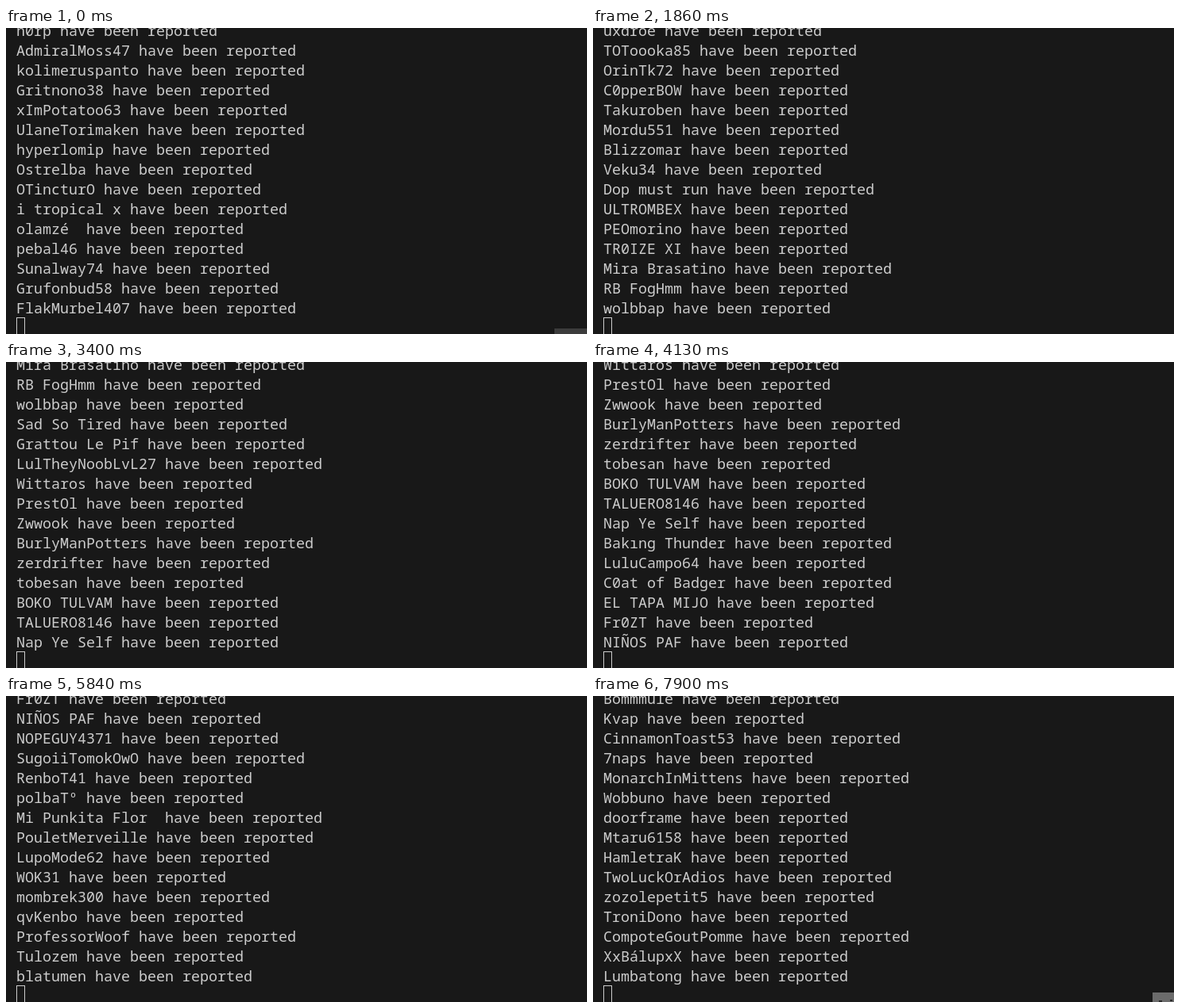
An HTML page that plays this animation: 731 px wide and 386 px high, repeating every 8 s.

```html
<!DOCTYPE html>
<html lang="en">
<head>
<meta charset="utf-8">
<title>Terminal log</title>
<style>
  html, body { margin: 0; width: 100%; height: 100%; overflow: hidden; background: #181818; }
  svg { display: block; width: 731px; height: 386px; }
  text { font: 18.333px "Noto Sans Mono", "DejaVu Sans Mono", monospace; fill: #ccc; white-space: pre; }
</style>
</head>
<body>
<svg viewBox="0 0 731 386">
  <g id="log"></g>
  <rect x="13.5" y="365.5" width="10" height="24" fill="none" stroke="#ccc"/>
  <rect id="sliver" x="690" y="379" width="41" height="7" fill="#3c3c3c"/>
  <g id="button">
    <rect x="704" y="374" width="27" height="12" fill="#6b6b6b"/>
    <path d="M712 385h4M726 384h3" stroke="#2a2a2a" stroke-width="2"/>
  </g>
</svg>
<script>
const LOOP = 8000, ROWS = 15, PITCH = 25;

const names = [
  "n0rp|AdmiralMoss47|kolimeruspanto|Gritnono38|xImPotatoo63|UlaneTorimaken|hyperlomip|Ostrelba",
  "OTincturO|i tropical x|olamzé |pebal46|Sunalway74|Grufonbud58|FlakMurbel407|uxdroe",
  "TOToooka85|OrinTk72|C0pperBOW|Takuroben|Mordu551|Blizzomar|Veku34|Dop must run",
  "ULTROMBEX|PEOmorino|TR0IZE XI|Mira Brasatino|RB FogHmm|wolbbap|Sad So Tired|Grattou Le Pif",
  "LulTheyNoobLvL27|Wittaros|PrestOl|Zwwook|BurlyManPotters|zerdrifter|tobesan|BOKO TULVAM",
  "TALUERO8146|Nap Ye Self|Bakıng Thunder|LuluCampo64|C0at of Badger|EL TAPA MIJO|Fr0ZT|NIÑOS PAF",
  "NOPEGUY4371|SugoiiTomokOwO|RenboT41|polbaTº|Mi Punkita Flor |PouletMerveille|LupoMode62|WOK31",
  "mombrek300|qvKenbo|ProfessorWoof|Tulozem|blatumen|dont wake me|Bommmule|Kvap",
  "CinnamonToast53|7naps|MonarchInMittens|Wobbuno|doorframe|Mtaru6158|HamletraK|TwoLuckOrAdios",
  "zozolepetit5|TroniDono|CompoteGoutPomme|XxBálupxX|Lumbatong"
].join("|").split("|");

// Times at which the log moves up by one line
const scrolls = [
  130, 260, 330, 460, 530, 660, 860, 1000, 1130, 1190,
  1390, 1520, 1650, 1720, 1860, 1990, 2120, 2250, 2320, 2460, 2600, 2730, 2930,
  3070, 3200, 3330, 3400, 3540, 3670, 3800, 3930, 4000, 4130, 4260,
  4410, 4530, 4590, 4730, 4860, 5120, 5250, 5380, 5440,
  5580, 5710, 5840, 5970, 6110, 6170, 6310, 6440, 6570,
  6710, 6840, 6970, 7100, 7170, 7310, 7440, 7570, 7700, 7830
];

const byId = id => document.getElementById(id);
const show = (el, on) => el.setAttribute("visibility", on ? "visible" : "hidden");
const sliver = byId("sliver"), button = byId("button");

const rows = Array.from({ length: ROWS }, (_, i) => {
  const row = document.createElementNS("http://www.w3.org/2000/svg", "text");
  row.setAttribute("x", 13);
  row.setAttribute("y", 10 + i * PITCH);
  return byId("log").appendChild(row);
});

let shown = -1;
function draw(t) {
  const top = scrolls.filter(s => s <= t).length;
  if (top !== shown) {
    rows.forEach((row, i) => { row.textContent = names[top + i] + " have been reported"; });
    shown = top;
  }
  show(sliver, t < 70);
  show(button, t >= 7900);
}

const start = performance.now();
function tick() {
  draw((performance.now() - start) % LOOP);
  requestAnimationFrame(tick);
}
tick();
</script>
</body>
</html>
```
